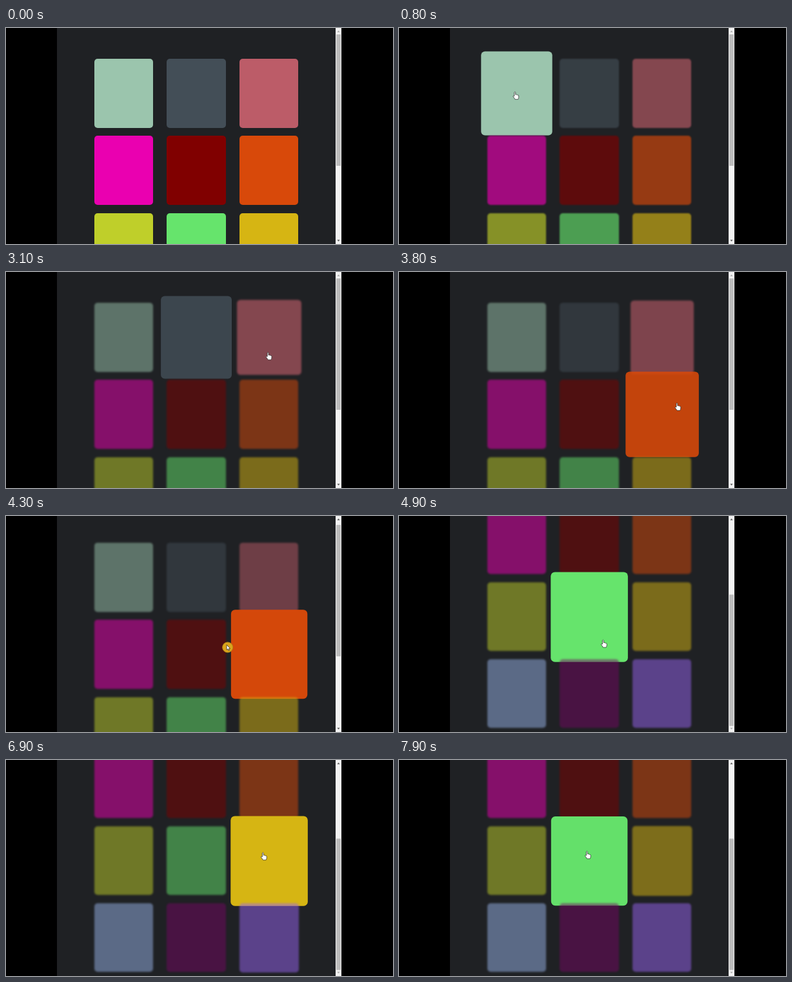
An HTML page for the animation above (8000 ms loop, 600 by 337 pixels).

```html
<!DOCTYPE html>
<html lang="en">
<head>
<meta charset="utf-8">
<title>Card hover</title>
<style>
  html, body { margin: 0; width: 100%; height: 100%; overflow: hidden; background: #000; }
  #stage { position: relative; width: 600px; height: 337px; overflow: hidden; background: #000; }
  #page { position: absolute; left: 79px; top: 0; width: 432px; height: 337px; overflow: hidden; background: #1f2124; }
  .card { position: absolute; border-radius: 5px; }
  #bar { position: absolute; left: 511px; top: 0; width: 9px; height: 337px; background: #f3f3f3; }
  #thumb { position: absolute; left: 1px; top: 9.5px; width: 7px; height: 205.5px; background: #bdbdbd; }
  #bar svg { position: absolute; left: 0; top: 0; }
  #pointer { position: absolute; left: 0; top: 0; overflow: visible; }
</style>
</head>
<body>
<div id="stage">
  <div id="page"></div>
  <div id="bar">
    <div id="thumb"></div>
    <svg width="9" height="337">
      <path id="up" d="M2.5 6.5 4.5 4 6.5 6.5Z"/>
      <path id="down" d="M2.5 330.5 4.5 333 6.5 330.5Z"/>
    </svg>
  </div>
  <svg id="pointer" width="1" height="1">
    <circle id="ring" r="8" fill="#dba51c" stroke="#b98a16"/>
    <g stroke="#222" stroke-width=".7" stroke-linejoin="round" fill="#fff">
      <path id="hand" d="M-2.6 1V-5Q-1.6-6.6-.7-5V-1.3Q.3-2.2 1-1 2-1.7 2.6-.5 4-.9 4.2.6V3Q4 4.5 3.2 6H-1.6Q-2.6 4-4.6 1.5-4.6-.2-2.6 1Z"/>
      <path id="arrow" d="M-1.5-4V4L.2 2.5 1.5 5.2 2.7 4.6 1.5 2H4Z"/>
    </g>
  </svg>
</div>
<script>
const LOOP = 8000, STEP = 100, FADE = 400, ENTER = 500;
const PAGE_X = 79, W = 91.5, H = 107.5, GROW = .3, MAX_SCROLL = 185.5;
const colors = `#9bc5ad #434e57 #bc5c68 #ea00b0 #800000 #d8490a
  #bfcf2a #66e46c #d6b513 #97b3e8 #730762 #9763f0`.split(/\s+/);

// pointer moves: start, end, target x, target y
const moves = [
  [500, 1000, 200, 112],
  [1800, 2300, 263, 119],
  [2900, 3300, 456, 135],
  [3500, 3900, 431, 215],
  [4000, 4500, 327, 203],
  [4500, 4900, 318, 199],
  [5000, 5500, 275, 280],
  [5800, 6100, 398, 267],
  [6400, 6800, 400, 150],
  [7500, 7800, 293, 148]
];

const $ = id => document.getElementById(id);
const clamp = v => Math.min(1, Math.max(0, v));
const progress = (t, from, to) => clamp((t - from) / (to - from));
const easeOut = x => x * (2 - x);
const smooth = x => x * x * (3 - 2 * x);

// CSS "ease": cubic-bezier(.25, .1, .25, 1)
function ease(x) {
  const bez = (a, b, u) => 3 * a * u * (1 - u) ** 2 + 3 * b * u * u * (1 - u) + u ** 3;
  let lo = 0, hi = 1;
  for (let i = 0; i < 20; i++) {
    const mid = (lo + hi) / 2;
    if (bez(.25, .25, mid) < x) lo = mid; else hi = mid;
  }
  return bez(.1, 1, lo);
}
const fade = (t, from) => ease(progress(t, from, from + FADE));

const scrollAt = t => MAX_SCROLL * smooth(progress(t, 4250, 4700));

function pointerAt(t) {
  let x = 84, y = 70;
  for (const [from, to, mx, my] of moves) {
    const k = easeOut(progress(t, from, to));
    x += (mx - x) * k;
    y += (my - y) * k;
  }
  return [x, y];
}

const cards = colors.map((color, i) => {
  const x = 136.5 + i % 3 * 112.7, y = 48.3 + Math.floor(i / 3) * 120.1;
  const el = document.createElement('div');
  el.className = 'card';
  el.style.cssText = `left:${x - PAGE_X}px;top:${y}px;width:${W}px;height:${H}px;background:${color}`;
  $('page').append(el);
  return { el, cx: x + W / 2, cy: y + H / 2 };
});

// Follow the pointer once to learn when each card is hovered.
const hovers = [];
function isOver(card, t, scale) {
  const [x, y] = pointerAt(t);
  return Math.abs(x - card.cx) < W / 2 * scale &&
         Math.abs(y + scrollAt(t) - card.cy) < H / 2 * scale;
}
for (let t = ENTER, now = null; t < LOOP; t += 2) {
  if (now && isOver(now.card, t, 1 + GROW)) continue;
  if (now) now.to = t;
  const card = cards.find(c => isOver(c, t, 1));
  now = card ? { card, from: t, to: Infinity } : null;
  if (now) hovers.push(now);
}

const show = (id, on) => $(id).style.display = on ? '' : 'none';
const arrowColor = active => active ? '#505050' : '#a3a3a3';

function draw(t) {
  const scroll = scrollAt(t);
  const inside = fade(t, hovers[0].from);

  for (const card of cards) {
    let lift = 0;
    for (const h of hovers)
      if (h.card === card) lift += fade(t, h.from) - (t > h.to ? fade(t, h.to) : 0);
    const dim = clamp(inside - lift);
    card.el.style.transform = `translateY(${-scroll}px) scale(${1 + GROW * lift})`;
    card.el.style.opacity = 1 - dim / 2;
    card.el.style.filter = dim > .01 ? `blur(${1.8 * dim}px)` : 'none';
  }

  $('thumb').style.transform = `translateY(${scroll * .607}px)`;
  $('up').style.fill = arrowColor(scroll > 0);
  $('down').style.fill = arrowColor(scroll < MAX_SCROLL);

  const [x, y] = pointerAt(t);
  const onCard = hovers.some(h => t >= h.from && t < h.to);
  $('pointer').style.transform = `translate(${x}px, ${y}px)`;
  show('pointer', t >= ENTER);
  show('hand', onCard);
  show('arrow', !onCard);
  show('ring', scroll > 0 && scroll < MAX_SCROLL / 2);
}

function tick() {
  const t = performance.now() % LOOP;
  draw(Math.floor(t / STEP) * STEP);
  requestAnimationFrame(tick);
}
tick();
</script>
</body>
</html>
```
